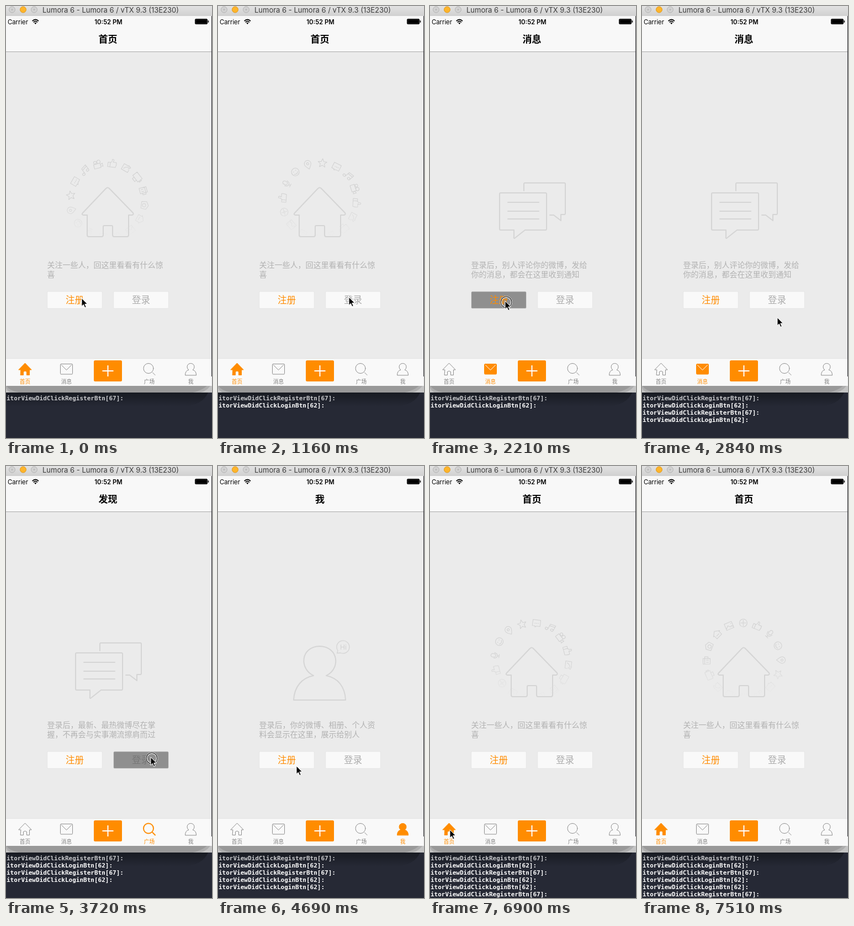
These frames come from a looping animation (373x779 px, 7.86 s). An HTML page:

```html
<!DOCTYPE html>
<html lang="zh-CN">
<head>
<meta charset="utf-8">
<title>Visitor view</title>
<style>
html, body { margin: 0; width: 100%; height: 100%; overflow: hidden; background: #262935; }
svg { display: block; width: 373px; height: 779px; }
text { font-family: "Noto Sans CJK SC", "Noto Sans CJK", sans-serif; }
.ui { font-family: Inter, Roboto, sans-serif; }
.log { font: bold 11px "DejaVu Sans Mono", monospace; fill: #fff; }
.mid { text-anchor: middle; }
.art { fill: none; stroke: #d5d5d5; stroke-width: 2; stroke-linejoin: round; stroke-linecap: round; }
.ring { fill: none; stroke: #d1d1d1; stroke-width: 1; stroke-linejoin: round; stroke-linecap: round; }
.msg { font-size: 14px; font-weight: 300; fill: #b2b2b2; }
.btn { font-size: 16.5px; }
.tab { fill: none; stroke: #8f8f8f; stroke-width: 1; stroke-linejoin: round; stroke-linecap: round; }
.tab text { font-size: 9.7px; fill: #808080; stroke: none; }
.tab.on { stroke: #ff8c00; }
.tab.on text { fill: #ff8c00; }
.tab.on .solid { fill: #ff8c00; }
.tab.on .bold { stroke-width: 2; }
.tab.on .flap { stroke: #fff; }
</style>
</head>
<body>
<svg viewBox="0 0 373 779">
  <defs>
    <linearGradient id="bar" x2="0" y2="1"><stop stop-color="#e2e2e2"/><stop offset="1" stop-color="#d0d0d0"/></linearGradient>
    <linearGradient id="fade" x2="0" y2="1"><stop stop-color="#ebebeb" stop-opacity="0"/><stop offset="1" stop-color="#ebebeb"/></linearGradient>
    <linearGradient id="shade" x2="0" y2="1"><stop stop-color="#181b22"/><stop offset="1" stop-color="#262935"/></linearGradient>
  </defs>

  <!-- console and window shadow -->
  <rect y="697" width="373" height="82" fill="#262935"/>
  <path d="M0 697H366Q356 720 322 722H0Z" fill="url(#shade)"/>
  <rect y="680" width="373" height="17" fill="#c4c4c4"/>
  <path d="M0 680H373Q366 694 352 697H8Q2 694 0 688Z" fill="#adadad"/>
  <path d="M0 680H368Q360 692 338 697H24Q6 694 0 684Z" fill="#999"/>
  <g id="logs"></g>

  <!-- title bar -->
  <rect width="373" height="18" fill="url(#bar)"/>
  <g stroke-width="1">
    <circle cx="11" cy="6.5" r="5.5" fill="#d2d2d2" stroke="#b4b4b4"/>
    <circle cx="31" cy="6.5" r="5.5" fill="#fdb52c" stroke="#e09a20"/>
    <circle cx="51" cy="6.5" r="5.5" fill="#d2d2d2" stroke="#b4b4b4"/>
    <circle cx="11" cy="6.5" r="1.5" fill="#b8b8b8"/>
    <circle cx="51" cy="6.5" r="1.5" fill="#b8b8b8"/>
  </g>
  <text class="ui" x="66" y="12" font-size="13" fill="#3c3c3c">Lumora 6 - Lumora 6 / vTX 9.3 (13E230)</text>

  <!-- phone screen -->
  <rect y="18" width="372" height="667" fill="#ebebeb"/>
  <rect y="18" width="372" height="64" fill="#f8f8f8"/>
  <rect y="82" width="372" height="1" fill="#a9a9a9"/>
  <rect x="372" y="18" width="1" height="650" fill="#2a2a2e"/>
  <rect x="372" y="668" width="1" height="17" fill="#e8e8e8"/>
  <text class="ui" x="3" y="32.5" font-size="11.3">Carrier</text>
  <g fill="none" stroke="#000" stroke-width="1.7">
    <path d="M47.6 27.2Q53.3 21.8 59 27.2M49.7 29.4Q53.3 26 56.9 29.4"/>
    <path d="M53.3 33L51.3 30.8Q53.3 29.2 55.3 30.8Z" fill="#000" stroke="none"/>
  </g>
  <text class="ui mid" x="185.5" y="32.5" font-size="11.3" font-weight="600">10:52 PM</text>
  <rect x="342.5" y="23.5" width="22" height="9" rx="1.5" fill="#000" stroke="#000"/>
  <rect x="343.5" y="24.5" width="20" height="7" rx=".5" fill="none" stroke="#777" stroke-width=".4"/>
  <rect x="365.6" y="26" width="1.6" height="4" rx=".8"/>
  <text id="title" class="mid" x="184.5" y="66" font-size="17" font-weight="bold"></text>

  <!-- page artwork -->
  <g class="page">
    <g id="ring" class="ring"></g>
    <rect x="100" y="345" width="170" height="70" fill="url(#fade)"/>
    <rect x="100" y="414" width="170" height="20" fill="#ebebeb"/>
    <path class="art" d="M147 377H140Q136 376 139 373L181 329Q184 326 187 329L230 373Q232 376 228 377H222V413Q222 416 219 416H196Q193 416 193 413V398Q193 396 191 396H178Q176 396 176 398V413Q176 416 173 416H150Q147 416 147 413Z"/>
  </g>
  <g id="chat">
    <path class="art" d="M170 333V321Q170 319 172 319H243Q245 319 245 321V374Q245 376 243 376H237V387L224 377H217"/>
    <path class="art" d="M128 337H209Q211 337 211 339V402Q211 404 209 404H172L153 419Q151 419 152 416V404H128Q126 404 126 402V339Q126 337 128 337ZM141 354H197M141 370H197M141 384H197"/>
  </g>
  <g id="person">
    <path class="art" d="M137 422C138 398 152 382 173 378C147 366 149 326 184 325C219 326 222 366 196 378C217 382 230 398 231 422Z"/>
    <path class="art" style="stroke-width:1.3" d="M217 333A11.5 11.5 0 1 1 222 337L215.500 337.500Z"/>
    <text class="ui mid" x="227" y="331" font-size="12" fill="#d2d2d2">Hi</text>
  </g>
  <text class="msg" id="row0" x="74.500" y="472"></text>
  <text class="msg" id="row1" x="74.500" y="489"></text>

  <!-- buttons -->
  <g stroke="#e2e2e2" stroke-width=".8">
    <rect id="reg" x="74.600" y="514.800" width="99.800" height="30.600" rx="2"/>
    <rect id="login" x="194.600" y="514.800" width="99.800" height="30.600" rx="2"/>
  </g>
  <text class="btn mid" x="124.500" y="536" fill="#ff8c00">注册</text>
  <text id="loginText" class="btn mid" x="244.500" y="536" fill="#adadad">登录</text>

  <!-- tab bar -->
  <rect y="636" width="372" height="49" fill="#f9f9f9"/>
  <rect y="635.500" width="372" height=".7" fill="#dedede"/>
  <g class="tab">
    <path class="solid" d="M26.500 656H22.800L34.500 644L46.200 656H42.500V665.500H37.500V659.500Q34.500 657 31.500 659.500V665.500H26.500Z"/>
    <text class="mid" x="34.500" y="681">首页</text>
  </g>
  <g class="tab">
    <rect class="solid" x="98.500" y="645.500" width="22" height="18.500" rx="1.500"/>
    <path class="flap" d="M100.500 647.500L109.500 656.500L118.500 647.500"/>
    <text class="mid" x="109.500" y="681">消息</text>
  </g>
  <rect x="159" y="639" width="51" height="38" rx="2.500" fill="#ff8c00"/>
  <path d="M174.500 658H194.500M184.500 648V668" stroke="#fff" stroke-width="2"/>
  <g class="tab">
    <g class="bold"><circle cx="258" cy="653.500" r="9"/><path d="M265.500 661L270 665.500"/></g>
    <text class="mid" x="259.500" y="681">广场</text>
  </g>
  <g class="tab">
    <path class="solid" d="M324.500 665.500Q324.500 657.500 331 656.200C326 653 327.500 644.500 334.500 644.500S343 653 338 656.200Q344.500 657.500 344.500 665.500Z"/>
    <text class="mid" x="334.500" y="681">我</text>
  </g>

  <g id="cursor">
    <g id="tap" fill="none"><circle cx="2" cy="2" r="9.500" stroke="#fff" stroke-width="3"/><circle cx="2" cy="2" r="9.800" stroke="#222" stroke-width="1.300"/></g>
    <path d="M0 0V14.500L3.400 11.400L5.800 17L8.200 16L5.800 10.500H10.400Z" stroke="#fff" stroke-width="1"/>
  </g>
</svg>
<script>
const $ = id => document.getElementById(id);
const LOOP = 7860;

// Each step lasts 90 ms, except these, which last 80 ms.
const SHORT = [10, 15, 18, 23, 35, 39, 42, 46, 59, 68, 73, 75, 79, 82, 87];
const starts = [];
for (let i = 0, t = 0; t < LOOP; i++) {
  starts.push(t);
  t += SHORT.includes(i) ? 80 : 90;
}

const PAGES = [
  { title: '首页', rows: ['关注一些人，回这里看看有什么惊', '喜'] },
  { title: '消息', rows: ['登录后，别人评论你的微博，发给', '你的消息，都会在这里收到通知'] },
  { title: '发现', rows: ['登录后，最新、最热微博尽在掌', '握，不再会与实事潮流擦肩而过'] },
  { title: '我', rows: ['登录后，你的微博、相册、个人资', '料会显示在这里，展示给别人'] }
];
const PAGE_AT = [[0, 0], [18, 1], [36, 2], [48, 3], [65, 0]];
const LOG_AT = [[0, 'R'], [7, 'L'], [26, 'R'], [31, 'L'], [43, 'L'], [56, 'R']];
const PRESS = { 6: 'login', 25: 'reg', 30: 'login', 42: 'login', 55: 'reg' };
const TAPS = [17, 35, 48, 65];

// [step, x, y]
const PATH = [
  [0, 137, 527], [5, 238, 526], [8, 237, 525], [13, 237, 525], [17, 110, 657], [21, 110, 657],
  [25, 136, 532], [26, 136, 532], [29, 240, 530], [31, 240, 530], [35, 260, 657], [36, 260, 657],
  [39, 261, 528], [40, 262, 525], [43, 262, 525], [47, 350, 650], [48, 334, 655], [50, 334, 655],
  [53, 142, 541], [54, 141, 533], [60, 141, 533], [63, 36, 656], [79, 36, 656], [85, 335, 800]
];
// [step, degrees]
const SPIN = [[0, -82.5], [8, -5.3], [12, -5.3], [13, 4.3], [18, 52], [65, -25], [66, -15], [79, -15], [85, 112]];

// Small outlines centred on 0,0, clockwise from the star.
const ICONS = [
  'M0-8L2.300-2.600L8-2.300L3.600 1.400L5 7L0 4L-5 7L-3.600 1.400L-8-2.300L-2.300-2.600Z',
  'M-7-6H7V5H1L-2 7V5H-7ZM-3 0H-2M0 0H1M3 0H4',
  'M-3 4V-6L7-8V2M-3-3L7-5M-3 4A2.500 2 0 1 1-8 4A2.500 2 0 1 1-3 4M7 2A2.500 2 0 1 1 2 2A2.500 2 0 1 1 7 2',
  'M-8-1H4V7H-8ZM4 2L8 0V6L4 4M-2-4A2.500 2.500 0 1 1-7-4A2.500 2.500 0 1 1-2-4M5-4A3 3 0 1 1-1-4A3 3 0 1 1 5-4',
  'M-8-1H-4V7H-8ZM-4 0L-1-4V-7Q2-8 2-5L1-2H7Q8 2 6 7H-4',
  'M2-5H-7V6H6V1M-4 3Q-2-2 4-3M2-6L7-4L4 0',
  'M-8-6H7V4H-8ZM-4 4V8H3V4M7-2L9-3V2L7 1',
  'M-6-6H4V7H-6ZM4-3H7V3H4M-6-3H4M-3 0V4M1 0V4',
  'M0-7L7-3L6 6H-6L-7-3ZM3 1A3 3 0 1 1-3 1A3 3 0 1 1 3 1',
  'M-7-5H7V6H-7ZM-4 3L4-2',
  'M-7-6H7V6H-7ZM-7 4L-2-1L2 3L4 1L7 4',
  'M-8-1L0-7L8-1H6V6H-6V-1ZM-3 2H3',
  'M-7-6H7V6H-7ZM-7 4L-2-1L2 3L4 1L7 4M4-3H5',
  'M7 0A7 7 0 1 1-7 0A7 7 0 1 1 7 0M0-5V-3M0 3V5M-5 0H-3M3 0H5M1.500 0A1.500 1.500 0 1 1-1.500 0A1.500 1.500 0 1 1 1.500 0',
  'M7 0A7 7 0 1 1-7 0A7 7 0 1 1 7 0M-3-2H-2M2-2H3M-4 2Q0 6 4 2',
  'M0 8Q-6 1-6-2A6 6 0 1 1 6-2Q6 1 0 8M2-2A2 2 0 1 1-2-2A2 2 0 1 1 2-2'
];
const MIC = 'M-3-5Q0-9 3-5V0Q0 4-3 0ZM-5-1Q-4 5 0 5T5-1M0 5V8M-3 8H3';
// Reel, thumb and microphone sit just before the smile.
const order = [0, 1, 2, 3, 4, 5, 6, 7, 8, 11, 12, 13, 4, -1, 14, 15];
const ICON_STEP = 360 / order.length;

$('ring').innerHTML = order.map((n, i) =>
  `<path transform="rotate(${i * ICON_STEP}) translate(0 -67.5)" d="${n < 0 ? MIC : ICONS[n]}"/>`).join('');
$('logs').innerHTML = LOG_AT.map(([, kind], i) =>
  `<text class="log" x="1" y="${711 + 13 * i}"${i ? '' : ' style="fill:#c9cacd"'}>itorViewDidClick${
    kind === 'R' ? 'RegisterBtn[67]:' : 'LoginBtn[62]:'}</text>`).join('');

const tabs = document.querySelectorAll('.tab');
const home = document.querySelector('.page');
const logs = $('logs').children;
const show = (el, on) => el.style.display = on ? '' : 'none';

function along(keys, step) {
  let k = 0;
  while (k < keys.length - 1 && keys[k + 1][0] <= step) k++;
  const a = keys[k], b = keys[k + 1];
  if (!b) return a.slice(1);
  const p = (step - a[0]) / (b[0] - a[0]);
  return a.slice(1).map((v, i) => v + (b[i + 1] - v) * p);
}

function draw(step) {
  const page = PAGE_AT.filter(([at]) => at <= step).pop()[1];
  const { title, rows } = PAGES[page];
  $('title').textContent = title;
  rows.forEach((row, i) => $('row' + i).textContent = row);
  show(home, page === 0);
  show($('chat'), page === 1 || page === 2);
  show($('person'), page === 3);
  tabs.forEach((tab, i) => tab.classList.toggle('on', i === page));
  LOG_AT.forEach(([at], i) => show(logs[i], at <= step));

  const press = PRESS[step];
  for (const id of ['reg', 'login']) $(id).setAttribute('fill', press === id ? '#8f8f8f' : '#f9f9f9');
  $('loginText').setAttribute('fill', press === 'login' ? '#777' : '#adadad');
  show($('tap'), press || TAPS.includes(step));

  const [x, y] = along(PATH, step);
  $('cursor').setAttribute('transform', `translate(${x} ${y})`);
  $('ring').setAttribute('transform', `translate(184 350.500) rotate(${along(SPIN, step)[0]})`);
}

let last = -1;
function tick() {
  const t = performance.now() % LOOP;
  let step = starts.length - 1;
  while (starts[step] > t) step--;
  if (step !== last) draw(last = step);
  requestAnimationFrame(tick);
}
tick();
</script>
</body>
</html>
```
